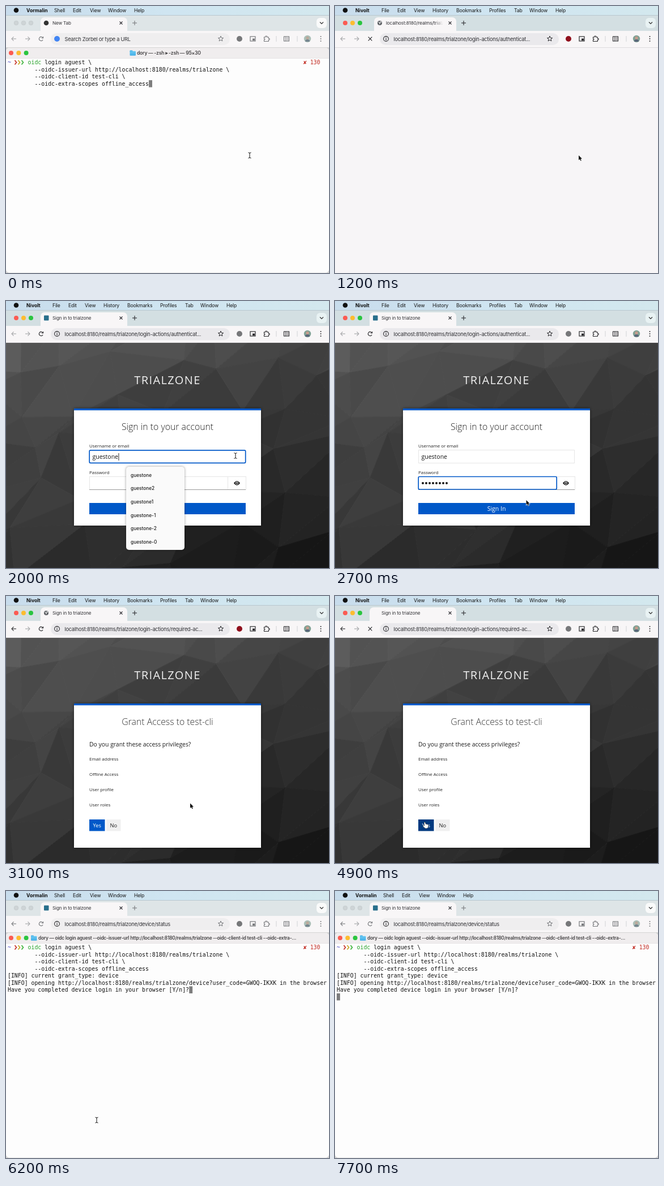
An HTML page with a canvas that plays this animation: 570 px wide and 472 px high, repeating every 8 s.

```html
<!DOCTYPE html>
<html lang="en">
<head>
<meta charset="utf-8">
<title>Device login</title>
<style>
html, body { margin: 0; width: 570px; height: 472px; overflow: hidden; background: #fdfdfd; }
canvas { display: block; }
</style>
</head>
<body>
<canvas id="stage" width="570" height="472"></canvas>
<script>
const W = 570, H = 472, LOOP = 8000, STEP = 100;
const ctx = document.getElementById('stage').getContext('2d');
const UI = 'Inter, sans-serif', PAGE = '"Open Sans", sans-serif', MONO = '"DejaVu Sans Mono", monospace';
const BLUE = '#0058c8', INK = '#2b2b2e';
const REALM = 'trialzone';
const BASE = `localhost:8180/realms/${REALM}/`;
const USER = 'guestone';

function rect(x, y, w, h, fill, r = 0) {
  ctx.fillStyle = fill;
  ctx.beginPath();
  ctx.roundRect(x, y, w, h, r);
  ctx.fill();
}

function disc(x, y, r, fill) {
  ctx.fillStyle = fill;
  ctx.beginPath();
  ctx.arc(x, y, r, 0, Math.PI * 2);
  ctx.fill();
}

function path(points, color, width = 1.1, close = false) {
  ctx.strokeStyle = color;
  ctx.lineWidth = width;
  ctx.beginPath();
  points.forEach(([x, y]) => ctx.lineTo(x, y));
  if (close) ctx.closePath();
  ctx.stroke();
}

function ring(x, y, r, color, width = 1.1) {
  ctx.strokeStyle = color;
  ctx.lineWidth = width;
  ctx.beginPath();
  ctx.arc(x, y, r, 0, Math.PI * 2);
  ctx.stroke();
}

function text(s, x, y, size, font, color, { weight = 400, spacing = 0, align = 'left' } = {}) {
  ctx.font = `${weight} ${size}px ${font}`;
  ctx.letterSpacing = spacing + 'px';
  ctx.textAlign = align;
  ctx.fillStyle = color;
  ctx.fillText(s, x, y);
}

function vertical(y0, y1, from, to) {
  const g = ctx.createLinearGradient(0, y0, 0, y1);
  g.addColorStop(0, from);
  g.addColorStop(1, to);
  return g;
}

function lights(x, y, gap, active) {
  const colors = active ? ['#fb5b52', '#fdbc2f', '#2ac53f'] : ['#ced4d6', '#ced4d6', '#ced4d6'];
  colors.forEach((c, i) => {
    disc(x + i * gap, y, 4, c);
    if (!active) ring(x + i * gap, y, 3.8, '#bfc6c8', 0.5);
  });
}

// --- Menu bar ---
const SHELL_MENU = ['Vormalin', ['Shell', 85], ['Edit', 118], ['View', 148], ['Window', 180], ['Help', 226]];
const BROWSER_MENU = ['Nivolt', ['File', 82], ['Edit', 110], ['View', 139], ['History', 172], ['Bookmarks', 214],
  ['Profiles', 272], ['Tab', 316], ['Window', 343], ['Help', 389]];

function menuBar([app, ...items]) {
  const g = ctx.createLinearGradient(0, 0, W, 0);
  g.addColorStop(0, '#c8dcec');
  g.addColorStop(0.5, '#cfe5f1');
  g.addColorStop(1, '#d3e8ee');
  rect(0, 0, W, 16, g);
  disc(18, 7.5, 4.3, '#111');
  text(app, 36, 10.7, 8.6, UI, '#111', { weight: 700 });
  for (const [label, x] of items) text(label, x, 10.7, 8.6, UI, '#151515', { spacing: -0.15 });
}

// --- Browser window ---
function favicon(kind, x, y) {
  if (kind === 'start') disc(x, y, 4.3, '#333');
  if (kind === 'site') rect(x - 4, y - 4.5, 8.5, 9, '#286f8c', 1);
  if (kind === 'globe') {
    disc(x, y, 4, '#5d6064');
    path([[x - 2.5, y - 1.5], [x + 0.5, y - 0.5], [x - 0.5, y + 2]], '#f4f4f4', 1.3);
    path([[x + 1, y - 3], [x + 2.8, y - 0.8]], '#f4f4f4', 1.2);
  }
}

function cross(x, y, r, color, width = 1.1) {
  path([[x - r, y - r], [x + r, y + r]], color, width);
  path([[x + r, y - r], [x - r, y + r]], color, width);
}

function arrow(x, y, dir, color) {
  path([[x - 4 * dir, y], [x + 4 * dir, y]], color);
  path([[x + 0.5 * dir, y - 3.6], [x + 4 * dir, y], [x + 0.5 * dir, y + 3.6]], color);
}

function reload(x, y, color) {
  ctx.strokeStyle = color;
  ctx.lineWidth = 1.1;
  ctx.beginPath();
  ctx.arc(x, y, 3.5, 0.5, Math.PI * 1.8);
  ctx.stroke();
  path([[x + 3.6, y - 4], [x + 3.6, y - 1.2], [x + 0.8, y - 1.2]], color);
}

function star(x, y, color) {
  const points = Array.from({ length: 10 }, (_, i) => {
    const a = -Math.PI / 2 + i * Math.PI / 5, r = i % 2 ? 2.1 : 4.9;
    return [x + r * Math.cos(a), y + r * Math.sin(a)];
  });
  path(points, color, 1, true);
}

function toolbarIcons(color, blocked, active) {
  star(379, 58, color);
  disc(412, 58, 5, blocked ? '#900f1c' : '#77787a');
  ctx.strokeStyle = color;
  ctx.lineWidth = 1.2;
  ctx.strokeRect(431, 54, 9, 8);
  rect(435, 57.5, 4, 3.5, color);
  path([[455.5, 55], [458, 55], [458, 53.3], [460.5, 53.3], [460.5, 55], [463.3, 55], [463.3, 57.5],
    [465, 57.5], [465, 59.7], [463.3, 59.7], [463.3, 62.5], [455.5, 62.5], [455.5, 59.8],
    [457, 58.8], [455.5, 57.6]], color, 1.1, true);
  rect(476.5, 53, 1, 10, '#d0d2d6');
  ctx.strokeRect(490.5, 54, 9, 8);
  path([[493.4, 54], [493.4, 62]], color, 0.8);
  for (let y = 56; y <= 60; y += 2) path([[494.5, y], [498.5, y]], color, 0.7);
  rect(513.5, 53, 1, 10, '#d0d2d6');

  ctx.save();
  if (!active) ctx.globalAlpha = 0.65;
  disc(532, 58, 6.2, '#7fa295');
  disc(532, 56.5, 2.7, '#c59c8c');
  ctx.fillStyle = '#596579';
  ctx.beginPath();
  ctx.arc(532, 63, 4, Math.PI, 0);
  ctx.fill();
  ctx.restore();
  for (let y = 54; y <= 62; y += 4) disc(555.5, y, 1, color);
}

function browser({ active, tab, icon, url, loading, blocked, canBack, opening }) {
  const color = active ? INK : '#77797c';
  const tabX = opening ? 69 : 61;
  rect(0, 16, W, 29, active ? '#d3dfe2' : '#dee5e7');
  rect(0, 16, W, 1, '#b9c8cf');
  lights(18, 30, 13, active);
  rect(tabX, 20, 214 - tabX, 26, '#f8f6f7', [7, 7, 0, 0]);
  favicon(icon, tabX + 10, 30);
  ctx.save();
  ctx.beginPath();
  ctx.rect(tabX, 18, 190 - tabX, 26);
  ctx.clip();
  text(tab, tabX + 21, 33, 8.1, UI, '#303034', { spacing: -0.12 });
  ctx.restore();
  if (opening) {
    const fade = ctx.createLinearGradient(175, 0, 191, 0);
    fade.addColorStop(0, '#f8f6f700');
    fade.addColorStop(1, '#f8f6f7');
    rect(175, 22, 16, 18, fade);
  }
  cross(203, 30, 2.5, '#303034');
  path([[223, 30], [231, 30]], color);
  path([[227, 26], [227, 34]], color);
  rect(548, 21, 18, 18, active ? '#e8f2f3' : '#f9fafa', 6);
  path([[554, 28.5], [557, 31.5], [560, 28.5]], '#333', 1.2);

  rect(0, 44, W, 30, '#f8f6f7');
  rect(0, 73, W, 1, '#dedcde');
  arrow(14, 58, -1, canBack ? color : '#a3a4a7');
  arrow(38, 58, 1, '#a3a4a7');
  if (loading) cross(62, 58, 3.3, color, 1.2);
  else reload(62, 58, color);
  rect(79, 48, 316, 21, active ? '#eae9ec' : '#efeeef', 10.5);
  if (url) {
    ring(90, 58, 4.4, INK);
    rect(89.5, 57, 1.1, 3.5, INK);
    disc(90, 55.6, 0.7, INK);
  } else {
    disc(90, 58, 5, '#4285f4');
  }
  text(url || 'Search Zorbel or type a URL', 103.5, 61.5, 9.2, UI, '#303034', { spacing: -0.25 });
  toolbarIcons(color, blocked, active);
}

// --- Web pages ---
function makeBackdrop() {
  const layer = new OffscreenCanvas(W, H);
  const g = layer.getContext('2d');
  const noise = (i, j, k) => {
    const v = Math.sin(i * 127.1 + j * 311.7 + k * 74.7) * 43758.5453;
    return v - Math.floor(v);
  };
  const point = (i, j) => [
    i * 92 - 60 + (noise(i, j, 1) - 0.5) * 76,
    j * 76 + 30 + (noise(i, j, 2) - 0.5) * 60];
  const facet = (points, seed) => {
    const x = points.reduce((s, p) => s + p[0], 0) / 3;
    const y = points.reduce((s, p) => s + p[1], 0) / 3;
    const shade = Math.round(Math.max(22, 89 - x * 0.045 - (y - 74) * 0.105 + (seed - 0.5) * 13));
    g.fillStyle = g.strokeStyle = `rgb(${shade},${shade},${shade})`;
    g.beginPath();
    points.forEach(p => g.lineTo(...p));
    g.closePath();
    g.fill();
    g.stroke();
  };
  for (let j = -1; j < 7; j++) {
    for (let i = -1; i < 9; i++) {
      const a = point(i, j), b = point(i + 1, j), c = point(i, j + 1), d = point(i + 1, j + 1);
      facet([a, b, c], noise(i, j, 3));
      facet([b, d, c], noise(i, j, 4));
    }
  }
  return layer;
}
const backdrop = makeBackdrop();

function card(bottom, heading, headingColor = '#202020') {
  ctx.drawImage(backdrop, 0, 74, W, H - 74, 0, 74, W, H - 74);
  text(REALM.toUpperCase(), 285, 147, 20, PAGE, '#f0f0f0', { spacing: 1.4, align: 'center' });
  ctx.save();
  ctx.shadowColor = '#0008';
  ctx.shadowBlur = 5;
  rect(120, 190, 330, bottom - 190, '#fff');
  ctx.restore();
  rect(120, 190, 330, 3.2, BLUE);
  text(heading, 285, 227.5, 15.8, PAGE, headingColor, { weight: 300, align: 'center' });
}

function eye(x, y) {
  ctx.fillStyle = '#222';
  ctx.beginPath();
  ctx.moveTo(x - 5.5, y);
  ctx.quadraticCurveTo(x, y - 7.5, x + 5.5, y);
  ctx.quadraticCurveTo(x, y + 7.5, x - 5.5, y);
  ctx.fill();
  disc(x, y, 2.4, '#fff');
  disc(x, y, 1.6, '#222');
}

function loginPage({ name, dots, list, hover }) {
  card(397, 'Sign in to your account');
  text('Username or email', 147, 259.3, 7.9, PAGE, '#222');
  const inPassword = dots > 0;
  ctx.lineWidth = 1;
  ctx.strokeStyle = '#e6e6e6';
  ctx.strokeRect(147.5, 263.5, 275, 23);
  ctx.strokeRect(147.5, 310.5, 244, 23);
  ctx.strokeRect(391.5, 310.5, 32, 23);
  rect(147, 333, 276, 1, '#999');
  ctx.strokeStyle = BLUE;
  ctx.lineWidth = 1.7;
  ctx.beginPath();
  ctx.roundRect(147.2, inPassword ? 310.5 : 263.8, inPassword ? 244 : 275.5, 22.5, 2);
  ctx.stroke();
  text(name, 152.5, 278.8, 10.5, PAGE, '#151515');
  if (!inPassword) rect(153 + ctx.measureText(name).width, 269, 0.9, 13, '#111');
  text('Password', 147, 306, 7.9, PAGE, '#222');
  for (let i = 0; i < dots; i++) disc(155 + i * 6, 322, 2, '#151515');
  eye(407.5, 322);
  rect(147, 357, 276, 20, hover ? '#00397f' : BLUE);
  text('Sign In', 285, 370.8, 10.5, PAGE, '#fff', { align: 'center' });
  if (!list) return;
  ctx.save();
  ctx.shadowColor = '#0006';
  ctx.shadowBlur = 4;
  rect(212, 293, 103, 147, '#fafafa', 5);
  ctx.restore();
  ['', '2', '1', '-1', '-2', '-0'].forEach((end, i) =>
    text(USER + end, 220, 310.5 + i * 23.7, 8.3, UI, '#1d1d1d', { weight: 500 }));
}

function grantPage(hover) {
  card(445, 'Grant Access to test-cli', '#333');
  text('Do you grant these access privileges?', 147, 266, 10.4, PAGE, '#1b1b1b');
  ['Email address', 'Offline Access', 'User profile', 'User roles'].forEach((label, i) =>
    text(label, 147, 291 + i * 27, 7.9, PAGE, '#222'));
  rect(147, 395, 27.5, 20.5, hover ? '#00397f' : BLUE);
  text('Yes', 160.7, 409.2, 9.3, PAGE, '#fff', { align: 'center' });
  rect(177, 395, 25.5, 20.5, '#f0f0f0');
  text('No', 189.7, 409.2, 9.3, PAGE, '#222', { align: 'center' });
}

function donePage() {
  card(286, 'Device Login Successful');
  text('You may close this browser window and go back to your device.', 147, 259.3, 7.9, PAGE, '#444');
}

// --- Shell window ---
const CELL = 5.93, LINE = 12.45;
const COMMAND = ['aguest \\', `--oidc-issuer-url http://${BASE.slice(0, -1)} \\`,
  '--oidc-client-id test-cli \\', '--oidc-extra-scopes offline_access'];
const OUTPUT = ['[INFO] current grant_type: device',
  `[INFO] opening http://${BASE}device?user_code=GWOQ-IKXK in the browser`,
  'Have you completed device login in your browser [Y/n]?'];

function cells(s, col, row, color = '#111') {
  text(s, 3 + col * CELL, 103.3 + row * LINE, 9.85, MONO, color);
}

function folder(x) {
  rect(x, 78.5, 5, 3, '#36a9e3', 1);
  rect(x, 79.7, 10.5, 8, vertical(79, 88, '#6ccaf4', '#43afe6'), 1);
}

function shell({ running, col, row }) {
  rect(0, 73, W, H - 73, '#d4d4d4');
  rect(0, 74, W, 397.5, '#fdfdfd', 6);
  rect(0, 74, W, 18.5, '#f0edee', [6, 6, 0, 0]);
  rect(0, 92, W, 0.7, '#e2dfe0');
  lights(9, 83, 13.3, true);
  const title = { weight: 600, spacing: -0.25 };
  folder(running ? 44 : 218.5);
  if (running) {
    text(`dory — oidc login aguest --oidc-issuer-url http://${BASE.slice(0, -1)} --oidc-client-id test-cli --oidc-extra-…`,
      57, 86, 8.4, UI, '#454345', title);
  } else {
    text('dory — -zsh ▸ -zsh — 95×30', 231, 86, 8.6, UI, '#454345', title);
  }
  cells('~', 0, 0, '#4545c8');
  ['#c32a20', '#c7a41b', '#35b034'].forEach((c, i) => {
    const x = 15.5 + i * 6;
    path([[x, 96], [x + 3, 99.8], [x, 103.6]], c, 1.6);
  });
  cells('oidc', 6, 0, '#27a32b');
  cells('login ' + COMMAND[0], 11, 0);
  COMMAND.slice(1).forEach((s, i) => cells(s, 8, i + 1));
  cells('✘ 130', 88, 0, '#c1281f');
  if (running) OUTPUT.forEach((s, i) => cells(s, 0, i + 4));
  rect(3 + col * CELL, 93.8 + row * LINE, CELL, LINE, '#7d7d7d');
}

// --- Pointer ---
function ibeam(x, y) {
  for (const [color, width] of [['#fff', 2.4], ['#111', 1]]) {
    path([[x, y - 4], [x, y + 4]], color, width);
    path([[x - 2.5, y - 5], [x, y - 4], [x + 2.5, y - 5]], color, width);
    path([[x - 2.5, y + 5], [x, y + 4], [x + 2.5, y + 5]], color, width);
  }
}

function shape(points, x, y, fill, line) {
  path(points.map(([a, b]) => [x + a, y + b]), line, 1.2, true);
  ctx.fillStyle = fill;
  ctx.fill();
}

function pointer(kind, x, y) {
  if (kind === 'ibeam') ibeam(x, y);
  if (kind === 'arrow') {
    shape([[0, 0], [0, 8.4], [2, 6.7], [3.4, 9.8], [4.8, 9.2], [3.5, 6.2], [6, 6]], x, y, '#111', '#fff');
  }
  if (kind === 'hand') {
    shape([[-2.5, -4.5], [-1.2, -5], [0, -1.5], [3, -1.2], [4.5, 0], [4, 4], [2.5, 5.5],
      [-1, 5.5], [-4.5, 1.5], [-3.6, 0.6], [-1.8, 1.4]], x, y, '#fff', '#333');
  }
}

function glide(t, start, end, from, to) {
  const p = Math.min(1, Math.max(0, (t - start) / (end - start)));
  const e = p * p * (3 - 2 * p);
  return from.map((v, i) => v + (to[i] - v) * e);
}

const REST = [430, 264], FIELD = [405, 273.5], SIGN_IN = [325, 366.5], YES = [160, 405], PROMPT = [283, 294];

function pointerAt(t) {
  if (t < 500) return ['ibeam', ...REST];
  if (t < 1000) return [];
  if (t < 2400) return [t < 2000 ? 'arrow' : 'ibeam', ...glide(t, 1700, 2000, REST, FIELD)];
  if (t < 3500) {
    const p = glide(t, 2400, 2800, FIELD, SIGN_IN);
    return [p[1] < 288 ? 'ibeam' : p[1] > 357 && t < 3000 ? 'hand' : 'arrow', ...p];
  }
  if (t < 6100) return [t < 4300 ? 'arrow' : 'hand', ...glide(t, 3500, 4400, SIGN_IN, YES)];
  if (t < 7600) return ['ibeam', ...glide(t, 6300, 7000, YES, PROMPT)];
  return [];
}

// --- Timeline ---
const signTab = 'Sign in to ' + REALM;
const DONE = { tab: signTab, icon: 'site', url: BASE + 'device/status', canBack: true };

function browserAt(t) {
  if (t < 1100) return { tab: 'New Tab', icon: 'start', url: '' };
  const login = BASE + 'login-actions/authenticat...';
  const grant = BASE + 'login-actions/required-ac...';
  if (t < 1300) return { tab: BASE, icon: 'globe', url: login, loading: true, blocked: true, opening: true };
  if (t < 3000) {
    const loading = t >= 2800;
    return { tab: signTab, icon: t < 1600 ? 'globe' : loading ? '' : 'site', url: login, loading, blocked: t < 1900 };
  }
  if (t < 5000) {
    const loading = t >= 4900;
    return { tab: signTab, icon: t < 3200 ? 'globe' : loading ? '' : 'site', url: grant, loading,
      blocked: t < 3600, canBack: true };
  }
  return { ...DONE, blocked: t < 5600 };
}

function shellBrowserAt(t) {
  return t < 1000 ? browserAt(t) : { ...DONE };
}

function pageAt(t) {
  if (t < 1300) rect(0, 74, W, H - 74, '#f7f5f7');
  else if (t < 3000) {
    loginPage({
      name: t < 2000 ? '' : USER,
      dots: t < 2400 ? 0 : Math.min(8, ((t - 2400) / STEP + 1) * 2),
      list: t >= 1900 && t < 2200,
      hover: t >= 2800
    });
  } else if (t < 5000) grantPage(t >= 4300);
  else donePage();
}

function draw(t) {
  ctx.clearRect(0, 0, W, H);
  const inShell = t < 1000 || t >= 6100;
  menuBar(inShell ? SHELL_MENU : BROWSER_MENU);
  browser({ ...(inShell ? shellBrowserAt(t) : browserAt(t)), active: !inShell });
  if (!inShell) pageAt(t);
  else if (t < 900) shell({ running: false, col: 42, row: 3 });
  else shell({ running: true, col: t < 7700 ? 54 : 0, row: t < 7700 ? 6 : 7 });
  pointer(...pointerAt(t));
}

const begin = performance.now();
function tick() {
  const t = (performance.now() - begin) % LOOP;
  draw(Math.floor(t / STEP) * STEP);
  requestAnimationFrame(tick);
}
tick();
</script>
</body>
</html>
```
